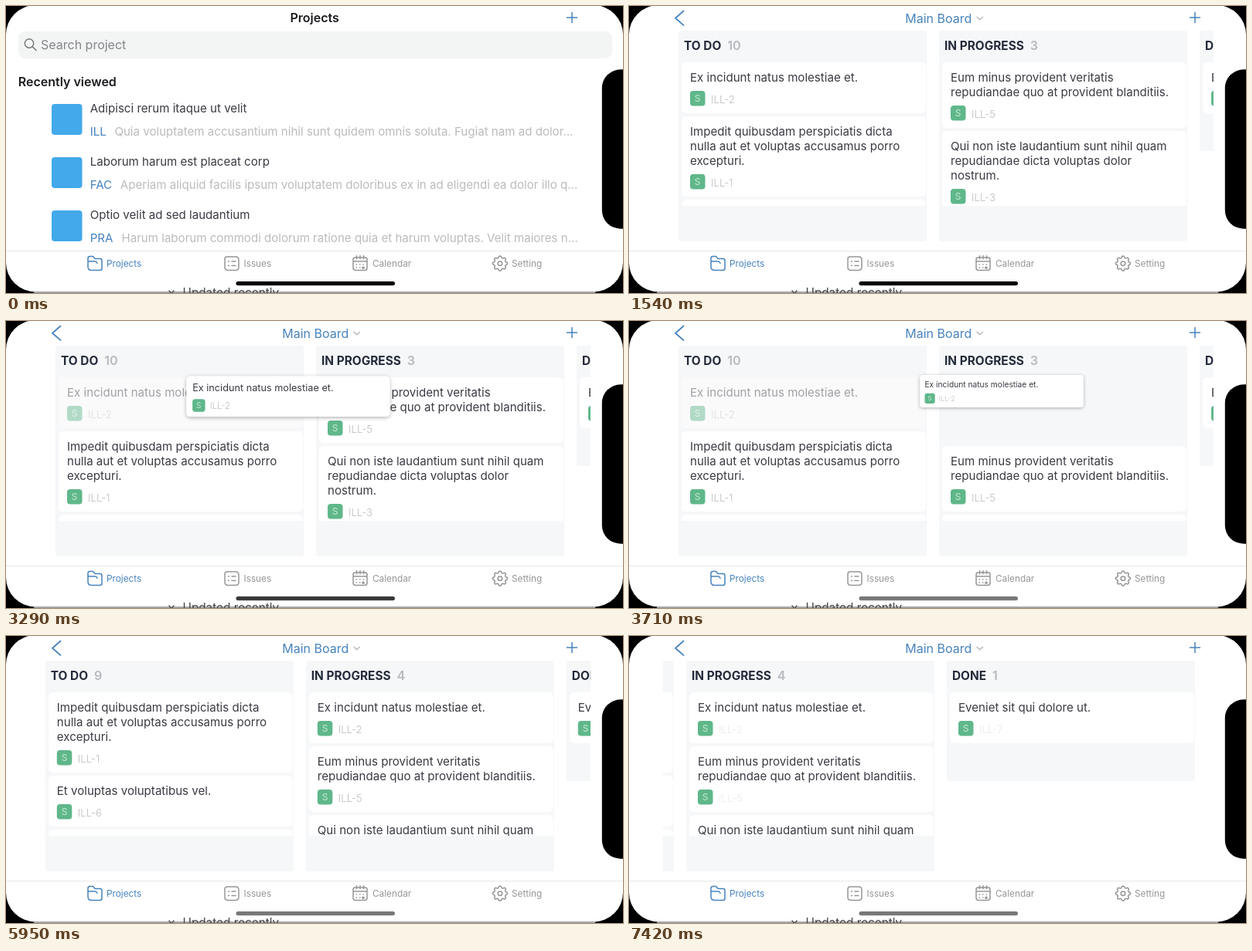
Write an HTML page that moves like this. It is 798x372 px and loops after 7.49 s.

```html
<!DOCTYPE html>
<html lang="en">
<head>
<meta charset="utf-8">
<title>Project board</title>
<style>
  html, body { margin: 0; width: 100%; height: 100%; overflow: hidden; background: #000; }
  svg { display: block; width: 100vw; height: 100vh; }
  text { font: 15.1px Inter, "Open Sans", sans-serif; fill: #3a3a43; white-space: pre; }
  .blue { fill: #4783bd; }
  .line { fill: none; stroke-width: 1.5; stroke-linecap: round; stroke-linejoin: round; }
  .nav { font-size: 16px; }
  .strong { font-weight: 600; fill: #1c1c20; }
  .desc { fill: #bbbbbd; }
  .tab { font-size: 11.8px; }
  .head { font-size: 15.4px; font-weight: 700; fill: #232a3a; }
  .count { font-size: 16.2px; font-weight: 600; fill: #b7babf; }
  .id { font-size: 13.2px; font-weight: 300; fill: #bcbcbc; opacity: var(--id, 1); }
  .badge { font-size: 12px; fill: #c4ebd3; text-anchor: middle; }
</style>
</head>
<body>
<svg id="stage" viewBox="0 0 798 372" preserveAspectRatio="none"></svg>
<script>
const LOOP = 7490, BLUE = '#4783bd', GREY = '#969698';

const rect = (x, y, w, h, r, fill, extra = '') =>
  `<rect x="${x}" y="${y}" width="${w}" height="${h}" rx="${r}" fill="${fill}" ${extra}/>`;
const text = (x, y, cls, s) => `<text x="${x}" y="${y}" class="${cls}">${s}</text>`;
const line = (d, color, extra = '') => `<path class="line" d="${d}" stroke="${color}" ${extra}/>`;
const clip = (id, x, y, w, h) => `<clipPath id="${id}">${rect(x, y, w, h, 0, '#000')}</clipPath>`;

const plus = line('M725.5 15h13M732 8.5v13', BLUE);

// Project list
const projects = [
  ['Adipisci rerum itaque ut velit', 'ILL',
    'Quia voluptatem accusantium nihil sunt quidem omnis soluta. Fugiat nam ad dolor...'],
  ['Laborum harum est placeat corp', 'FAC',
    'Aperiam aliquid facilis ipsum voluptatem doloribus ex in ad eligendi ea dolor illo q...'],
  ['Optio velit ad sed laudantium', 'PRA',
    'Harum laborum commodi dolorum ratione quia et harum voluptas. Velit maiores n...']
];
const row = ([title, key, desc], i) => `<g transform="translate(0 ${i * 69})">
  ${rect(59, 127, 39.5, 40, 4, '#43a9ea')}
  ${text(108.7, 137.5, '', title)}
  <text x="108.7" y="167.5" class="blue">${key}<tspan class="desc" dx="11">${desc}</tspan></text></g>`;

const list = `<g id="list">
  ${text(367.5, 20.5, 'nav strong', 'Projects')}${plus}
  ${rect(16, 33, 768, 35, 9, '#f3f4f4')}
  <circle class="line" cx="30" cy="48.5" r="5.7" stroke="#77777b"/>${line('M34.5 53l4.5 4.5', '#77777b')}
  <text x="45" y="55.5" class="nav" style="fill:#85858a">Search project</text>
  ${text(15.7, 103.5, 'nav strong', 'Recently viewed')}
  ${rect(0, 112.5, 798, 69.5, 0, '#dedae2', 'id="press" style="mix-blend-mode:multiply"')}
  ${projects.map(row).join('')}</g>`;

// Board: a card is as tall as its lines need
const cardHeight = lines => 47 + 19 * lines.length;
const card = (id, lines, key, inset = 0) => {
  const mid = 28 + 19 * lines.length;
  return `<g id="${id}">
    ${rect(inset, inset, 316 - 2 * inset, cardHeight(lines) - 2 * inset, 6, '#fff')}
    ${lines.map((s, i) => text(11, 25 + 19 * i, '', s)).join('')}
    ${rect(11, mid - 10, 19.5, 19.5, 4, '#5fb78a')}
    ${text(20.7, mid + 4.2, 'badge', 'S')}${text(38, mid + 5.5, 'id', key)}</g>`;
};
const first = ['Ex incidunt natus molestiae et.'];
const cards = [
  // id, column, top, lines, key
  ['origin', 0, 73, first, 'ILL-2'],
  ['a1', 0, 143, ['Impedit quibusdam perspiciatis dicta', 'nulla aut et voluptas accusamus porro', 'excepturi.'], 'ILL-1'],
  ['a2', 0, 251, ['Et voluptas voluptatibus vel.'], 'ILL-6'],
  ['a3', 0, 321, ['Quo sit.'], 'ILL-4'],
  ['dropped', 1, 73, first, 'ILL-2'],
  ['b1', 1, 73, ['Eum minus provident veritatis', 'repudiandae quo at provident blanditiis.'], 'ILL-5'],
  ['b2', 1, 162, ['Qui non iste laudantium sunt nihil quam', 'repudiandae dicta voluptas dolor', 'nostrum.'], 'ILL-3'],
  ['c1', 2, 73, ['Eveniet sit qui dolore ut.'], 'ILL-7']
];
const column = (name, i, h) => `${rect(64 + i * 337, 32, 321, h, 3, '#f6f7f9')}
  <text x="${71 + i * 337}" y="57" class="head">${name}<tspan class="count" dx="8" id="n${i}">1</tspan></text>`;

const board = `<g id="board">${rect(0, 0, 798, 318, 0, '#fff')}
  ${line('M70.5 6.5l-10.5 9.2 10.5 9.2', BLUE, 'style="stroke-width:1.8"')}
  ${text(357.2, 21.5, 'nav blue', 'Main Board')}
  ${line('M450 14.2l3.7 3.6 3.7-3.6', '#b9b9bc')}${plus}
  <g clip-path="url(#wide)"><g class="scroll">
    ${column('TO DO', 0, 273)}${column('IN PROGRESS', 1, 273)}${column('DONE', 2, 156)}</g></g>
  <g clip-path="url(#cards)"><g class="scroll">
    ${cards.map(([id, , , lines, key]) => card(id, lines, key)).join('')}</g></g>
  ${card('fly', first, 'ILL-2', 1.8)}</g>`;

// Tab bar
const gear = Array.from({ length: 48 }, (_, i) => {
  const a = i * Math.PI / 24, r = 8.5 + 1.1 * Math.tanh(2 * Math.cos(8 * a));
  return `${i ? 'L' : 'M'}${(639 + r * Math.cos(a)).toFixed(1)} ${(333.7 + r * Math.sin(a)).toFixed(1)}`;
}).join('') + 'Z';
const dots = [[453, 335], [457.5, 335], [453, 339], [457.5, 339], [462, 335]]
  .map(([x, y]) => `M${x} ${y}h.5`).join('');
const tab = (x, s, color) => `<text x="${x}" y="338" class="tab" style="fill:${color}">${s}</text>`;
const tabs = `${rect(0, 317.5, 798, 60, 0, '#fff')}${rect(0, 317.3, 798, 1, 0, '#e6e6e8')}
  ${line('M106 338v-11q0-2.5 2.5-2.5h4l2.5 3h6.5q2.5 0 2.5 2.5v10q0 2.5-2.5 2.5h-11q-4.5 0-4.5-4.5zM106 331h9.5q1.5 0 2 1.5l.5 1', BLUE)}
  ${line('M286 325h11q4 0 4 4v9.5q0 4-4 4h-10q-4 0-4-4V328q0-3 3-3zM287.5 331h1M292 331h5M287.5 336.5h1M292 336.5h5', GREY)}
  ${line('M451.5 326h13q2.5 0 2.5 2.5v11q0 3-3 3h-12q-3 0-3-3v-11q0-2.5 2.5-2.5zM449 331h18M453.5 323.8v4M458 323.8v4M462.5 323.8v4' + dots, GREY)}
  <circle cx="462" cy="339.3" r="1.8" fill="${GREY}"/>
  ${line(gear, GREY)}<circle class="line" cx="639" cy="333.7" r="2.8" stroke="${GREY}"/>
  ${tab(130, 'Projects', BLUE)}${tab(307.5, 'Issues', GREY)}${tab(474, 'Calendar', GREY)}${tab(654, 'Setting', GREY)}
  ${rect(297.5, 357, 205.5, 5.2, 2.6, '#000', 'id="home"')}`;

const stage = document.getElementById('stage');
stage.innerHTML = `<defs>
  <clipPath id="screen">${rect(0, -1, 798, 371.5, 38, '#000')}</clipPath>
  ${clip('wide', 44, 0, 712, 318)}${clip('cards', 44, 70, 712, 189)}
  <filter id="shadow" x="-10%" y="-30%" width="120%" height="170%">
    <feDropShadow dx="0" dy="1.5" stdDeviation="3" flood-color="#000" flood-opacity="0"/></filter></defs>
  ${rect(0, 0, 798, 372, 0, '#000')}
  ${rect(36, 370.5, 726, 2, 0, '#a5a5a5')}
  <g clip-path="url(#screen)">${rect(0, -1, 798, 374, 0, '#fff')}${list}${board}${tabs}</g>
  ${line('M211 369l3 4 3-4', '#555')}
  <text x="228.5" y="377" style="font-size:15.3px;fill:#444">Updated recently</text>
  ${rect(770.8, 82.3, 60, 206.4, 24, '#000')}`;

const el = Object.fromEntries([...stage.querySelectorAll('[id]')].map(e => [e.id, e]));
const scrolls = stage.querySelectorAll('.scroll');
const shade = stage.querySelector('feDropShadow');
el.fly.setAttribute('filter', 'url(#shadow)');

const span = (t, a, b) => Math.min(1, Math.max(0, (t - a) / (b - a)));
const easeOut = p => 1 - (1 - p) ** 3;
const easeInOut = p => p < .5 ? 4 * p ** 3 : 1 - 4 * (1 - p) ** 3;
const smooth = p => p * p * (3 - 2 * p);
const mix = (a, b, p) => a + (b - a) * p;
const move = (e, x, y, s = 1) => e.setAttribute('transform', `translate(${x} ${y}) scale(${s})`);
const show = (e, on) => e.setAttribute('visibility', on ? 'visible' : 'hidden');

function draw(t) {
  // Open the pressed project
  const push = easeOut(span(t, 980, 1400));
  el.press.setAttribute('opacity', span(t, 600, 770));
  move(el.list, -240 * push, 0);
  move(el.board, 798 * (1 - push), 0);
  show(el.list, push < 1);

  // Lift, drag over, hover, drop
  const lift = smooth(span(t, 2170, 2600));
  const drag = smooth(span(t, 2900, 3640));
  const hover = smooth(span(t, 3710, 4340));
  const drop = smooth(span(t, 4480, 4830));
  const cx = mix(mix(226, 482, drag) + 24 * hover, 563, drop);
  const cy = mix(mix(106, 91, drag) + 5 * hover, 106, drop);
  const scale = mix(mix(1 + .037 * lift, .677, drag), 1, drop);
  move(el.fly, cx - 158 * scale, cy - 33 * scale, scale);
  show(el.fly, t >= 2170 && t < 4900);
  shade.setAttribute('flood-opacity', .32 * lift * (1 - drop));

  // Both columns make room
  const gap = 89 * smooth(span(t, 3350, 3640)) - 19 * drop;
  const shift = { a: -70 * drop, b: gap };
  for (const [id, col, top] of cards) move(el[id], 68 + 337 * col, top + (shift[id[0]] || 0));
  const fade = mix(1, .45, span(t, 2940, 3150)) * (1 - span(t, 4480, 4690));
  el.origin.setAttribute('opacity', fade);
  show(el.origin, t < 2170 || t >= 2900);
  show(el.dropped, t >= 4900);
  el.n0.textContent = t < 4690 ? 10 : 9;
  el.n1.textContent = t < 4690 ? 3 : 4;

  // Swipe to the next column
  const swipe = easeInOut(span(t, 5670, 6970));
  scrolls.forEach(g => move(g, -327 * swipe, 0));
  el.board.style.setProperty('--id', 1 - .7 * swipe);
  const tone = Math.round(120 * span(t, 3100, 3500));
  el.home.setAttribute('fill', `rgb(${tone},${tone},${tone})`);
}

const start = performance.now();
function tick() {
  draw((performance.now() - start) % LOOP);
  requestAnimationFrame(tick);
}
tick();
</script>
</body>
</html>
```
